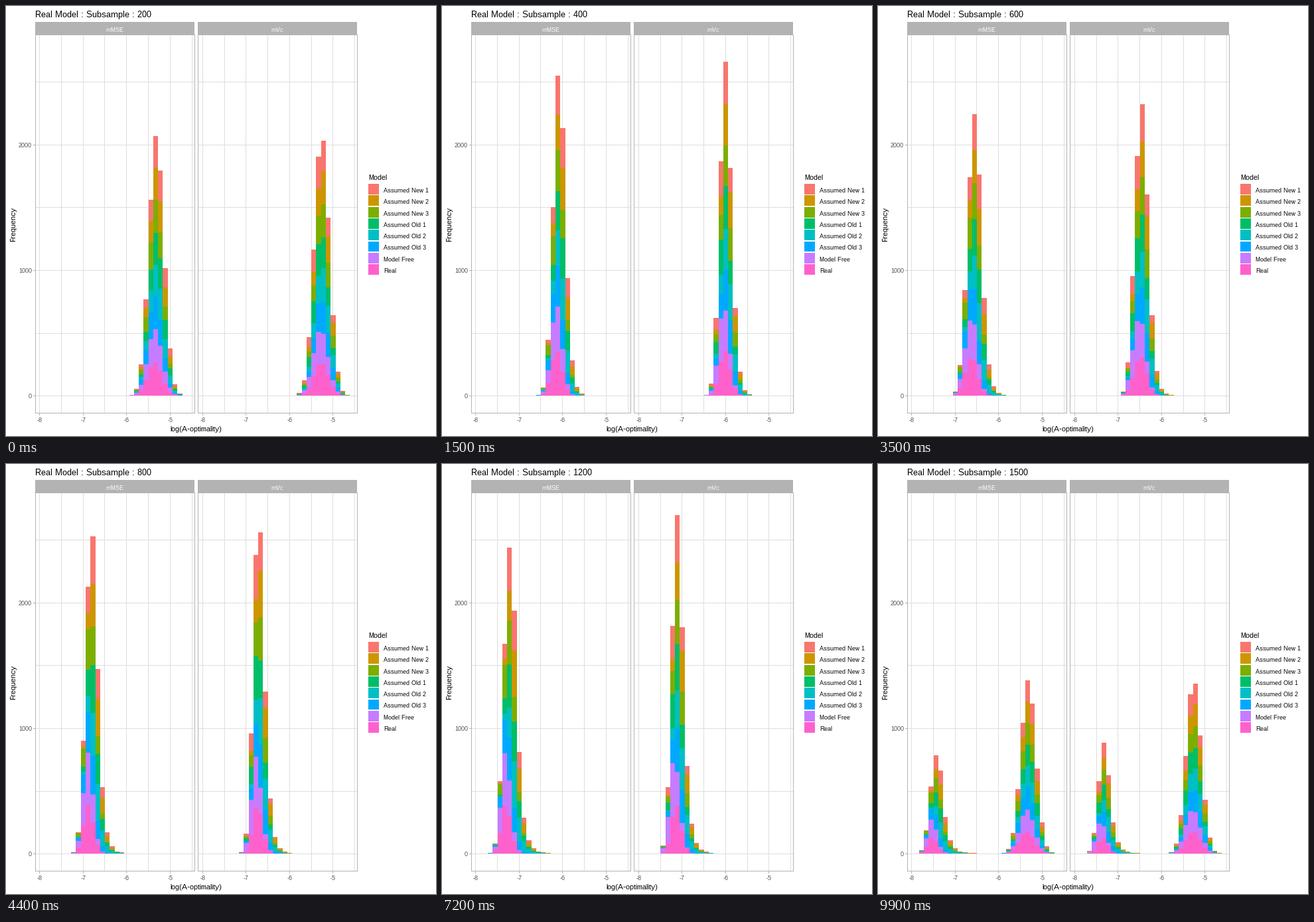
A matplotlib script that plays this animation: 648x648 px, repeating every 10 s.

```python
import math

import matplotlib.pyplot as plt
import numpy as np
from matplotlib.animation import FuncAnimation
from matplotlib.collections import PolyCollection
from matplotlib.patches import Rectangle

SIZE, DPI = 648, 72
FRAMES, INTERVAL = 100, 100
SIZES = range(200, 1501, 100)
BINS, DRAWS = 30, 1000
PANELS = (("mMSE", 44), ("mVc", 289))
PANEL_SHIFT = 245.6
TOP, BOTTOM, WIDTH = 43, 613, 240
ZERO, PX_PER_COUNT = 587, 0.1889

GREY70, GREY87, GREY30 = "#B3B3B3", "#DEDEDE", "#4D4D4D"
MODELS = {
    "Assumed New 1": "#F8766D", "Assumed New 2": "#CD9600",
    "Assumed New 3": "#7CAE00", "Assumed Old 1": "#00BE67",
    "Assumed Old 2": "#00BFC4", "Assumed Old 3": "#00A9FF",
    "Model Free": "#C77CFF", "Real": "#FF61CC",
}
STACK = list(MODELS)[::-1]  # bottom to top

# Everything is measured in bins, with u = ln(n / 200).
CENTRE = (  # polynomial in u, one per panel
    lambda u: 23.65 - 10.2 * u + 0.4 * u * u,
    lambda u: 24.15 - 9.75 * u + 0.275 * u * u,
)
SHAPE = {  # final spread, growth of the right tail
    "1": (0.94, 0.25), "2": (0.96, 0.34), "3": (1.06, 0.11),
    "Free": (0.87, 0.04), "Real": (0.93, 0.06),
}
OFFSET = (  # start and drift of each model around the centre
    {"1": (0.27, 0.07), "2": (0.28, 0.32), "3": (-0.21, -0.04),
     "Free": (-0.26, -0.41), "Real": (-0.32, -0.29)},
    {"1": (-0.27, 0.06), "2": (0.30, 0.20), "3": (0.20, 0.0),
     "Free": (-0.33, -0.34), "Real": (-0.12, -0.10)},
)

normal_cdf = np.vectorize(lambda z: 0.5 * (1 + math.erf(z / math.sqrt(2))))


def bin_counts(panel, model, n):
    """Bin counts of a bell curve whose right tail is stretched."""
    kind = model.split()[-1]
    u = math.log(n / 200)
    start, drift = OFFSET[panel][kind]
    final, growth = SHAPE[kind]
    mid = CENTRE[panel](u) + start + drift * u
    spread = final + (1.48 - final) * math.exp(-2 * u)
    skew = growth * u + 1e-6
    t = (np.arange(BINS + 1) - mid) / spread
    z = np.where(t > 0, np.log1p(skew * np.maximum(t, 0)) / skew, t)
    return np.round(DRAWS * np.diff(normal_cdf(z)))


def build_timeline():
    """(state, next state, progress, titled state) for each frame."""
    steps = []
    total = len(SIZES)
    for i in range(total):
        after = (i + 1) % total
        n = 4 if i < 3 else 3
        steps += [(i, after, 0, i)] * 4
        for j in range(1, n + 1):
            steps.append((i, after, j / n, i if j <= math.ceil(n / 2) else after))
    return steps[:FRAMES]


COUNTS = [np.array([[bin_counts(p, m, n) for m in STACK] for p in range(2)])
          for n in SIZES]
TIMELINE = build_timeline()
EDGES = [np.floor(55.06 + PANEL_SHIFT * p + 7.275 * np.arange(BINS + 1)) for p in range(2)]

plt.rcParams.update({"font.family": "Liberation Sans",
                     "text.hinting": "native", "text.hinting_factor": 1})
fig = plt.figure(figsize=(SIZE / DPI, SIZE / DPI), dpi=DPI, facecolor="white")
ax = fig.add_axes([0, 0, 1, 1])
ax.set_xlim(0, SIZE)
ax.set_ylim(SIZE, 0)
ax.axis("off")


def box(x, y, w, h, color, z=1):
    ax.add_patch(Rectangle((x, y), w, h, facecolor=color, linewidth=0,
                           antialiased=False, snap=False, zorder=z))


def label(x, y, text, size, color="black", ha="left", va="baseline", **kw):
    return ax.text(x, y, text, fontsize=size, color=color, ha=ha, va=va, zorder=5, **kw)


def draw_panel(index, name, left):
    box(left, 24, WIDTH, TOP - 24, GREY70)
    label(left + WIDTH / 2 - 0.5, 39, name, 9, "white", "center")
    for k in range(6):
        box(left, math.floor(587.6 - 94.55 * k), WIDTH, 1, GREY87)
    for k in range(8):
        x = math.floor(50.65 + PANEL_SHIFT * index + 32.77 * k)
        box(x, TOP, 1, BOTTOM - TOP, GREY87)
        if k % 2 == 0:
            box(x, BOTTOM, 1, 4, GREY70)
            label(x + 0.3, 627, f"-{8 - k // 2}", 9, GREY30, "center")
    for y in (TOP, BOTTOM):
        box(left, y, WIDTH + 1, 1, GREY70, 4)
    for x in (left, left + WIDTH):
        box(x, TOP, 1, BOTTOM - TOP, GREY70, 4)


def draw_legend():
    label(546, 262, "Model", 11)
    for i, (name, color) in enumerate(MODELS.items()):
        y = 268.15 + 17.28 * i
        y0, y1 = round(y), round(y + 15.86)
        box(546, y0, 16, y1 - y0, color)
        label(569, round(y + 12.8), name, 9)


for p, (panel, left) in enumerate(PANELS):
    draw_panel(p, panel, left)
for k in range(3):
    y = math.floor(587.6 - 189.1 * k)
    box(41, y, 3, 1, GREY70)
    label(39, y + 4, str(1000 * k), 9, GREY30, "right")
label(286, 641, "log(A-optimality)", 11, ha="center")
label(11.5, 329, "Frequency", 11, ha="center", va="center", rotation=90)
draw_legend()
title = label(44, 17, "", 13)

bars = PolyCollection([], linewidths=0, antialiaseds=False, zorder=3)
bars.set_snap(False)
ax.add_collection(bars, autolim=False)


def stacked_bars(counts):
    verts, colors = [], []
    for edges, stack in zip(EDGES, counts):
        tops = np.vstack([np.zeros(BINS), np.cumsum(stack, axis=0)])
        ys = np.round(ZERO - PX_PER_COUNT * tops)
        for m, name in enumerate(STACK):
            for b in range(BINS):
                y0, y1 = ys[m, b], ys[m + 1, b]
                if y1 < y0:
                    x0, x1 = edges[b], edges[b + 1]
                    verts.append([(x0, y0), (x1, y0), (x1, y1), (x0, y1)])
                    colors.append(MODELS[name])
    return verts, colors


def update(frame):
    state, after, progress, titled = TIMELINE[frame]
    counts = (1 - progress) * COUNTS[state] + progress * COUNTS[after]
    verts, colors = stacked_bars(counts)
    bars.set_verts(verts)
    bars.set_facecolor(colors)
    title.set_text(f"Real Model : Subsample : {SIZES[titled]}")
    return bars, title


anim = FuncAnimation(fig, update, frames=FRAMES, interval=INTERVAL,
                     init_func=lambda: update(0), repeat=True, repeat_delay=0)
plt.show()
```
